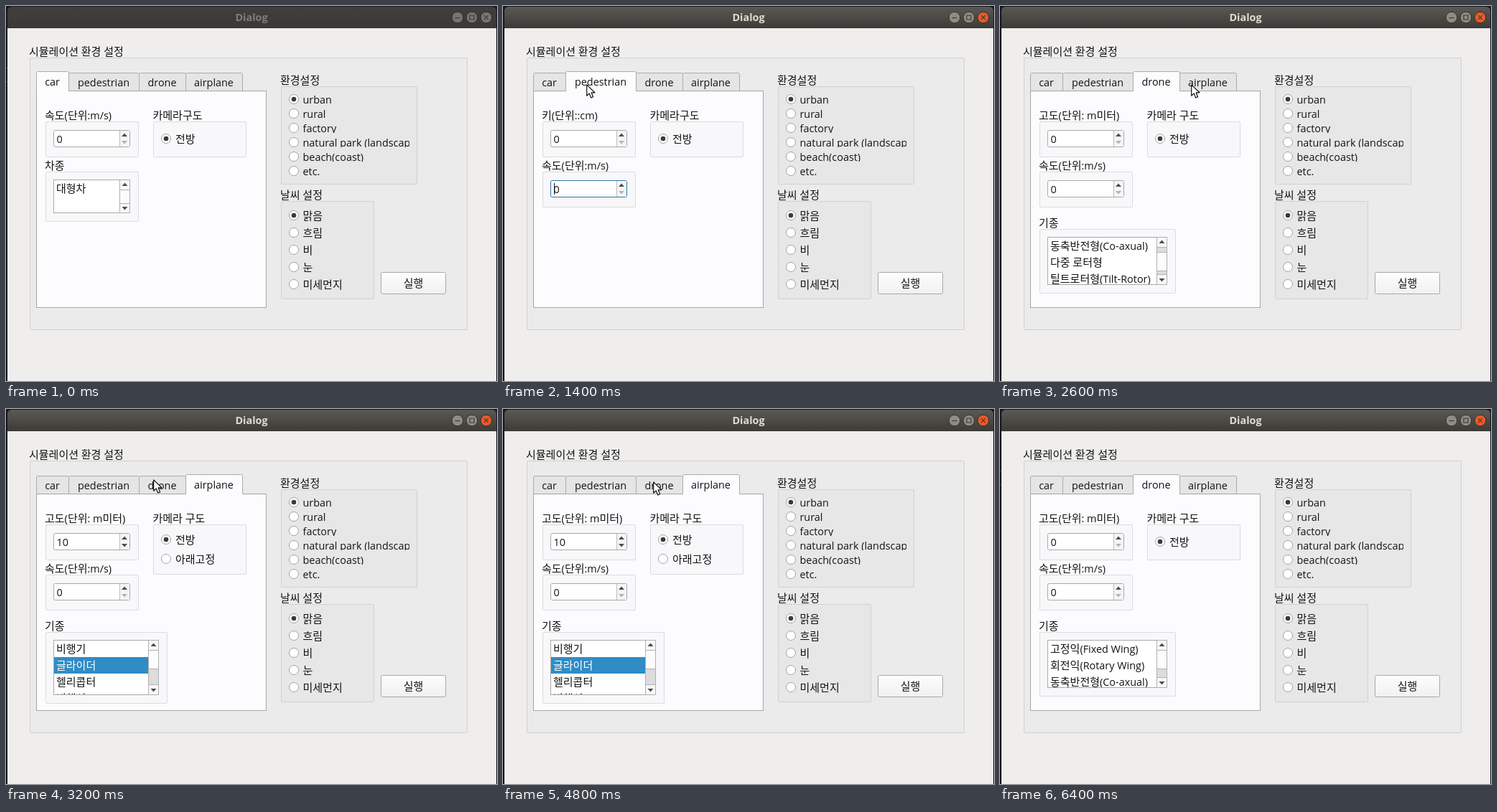
Write an HTML page that moves like this. It is 684 by 523 pixels and loops after 6500 ms.

```html
<!DOCTYPE html>
<html lang="ko">
<head>
<meta charset="utf-8">
<title>Dialog</title>
<style>
html, body { margin: 0; width: 100%; height: 100%; overflow: hidden; background: #17151d; }
#stage { display: block; position: absolute; left: 0; top: 0; }
text { font: 14.4px "Open Sans", "Noto Sans CJK KR", "Noto Sans CJK", sans-serif; fill: #141414; white-space: pre; }
.ko { font-family: "Noto Sans CJK KR", "Noto Sans CJK", sans-serif; font-size: 15px; }
.bold { font-weight: 700; }
.mid { text-anchor: middle; }
.light, .light tspan { fill: #fff; }
</style>
</head>
<body>
<svg id="stage" width="684" height="523" viewBox="0 0 684 523" xmlns="http://www.w3.org/2000/svg"></svg>
<script>
const LOOP = 6500, STEP = 100, ROW = 23;

// ---- markup helpers ----
const fill = (x, y, x2, y2, color) =>
  `<rect x="${x}" y="${y}" width="${x2 - x}" height="${y2 - y}" fill="${color}"/>`;

const box = (x, y, x2, y2, color, line, r = 0) =>
  `<rect x="${x + .5}" y="${y + .5}" width="${x2 - x - 1}" height="${y2 - y - 1}" rx="${r}" fill="${color}" stroke="${line}"/>`;

const label = (x, y, str, cls = '') => {
  const body = str.replace(/[가-힣]+/g, run => `<tspan class="ko">${run}</tspan>`);
  return `<text x="${x}" y="${y}" class="${cls}">${body}</text>`;
};

const clip = (x, y, x2, y2, body) =>
  `<svg x="${x}" y="${y}" width="${x2 - x}" height="${y2 - y}" viewBox="${x} ${y} ${x2 - x} ${y2 - y}" overflow="hidden">${body}</svg>`;

const radio = (x, y, on) =>
  `<circle cx="${x}" cy="${y}" r="6.5" fill="#fff" stroke="#a2a2a2"/>` +
  (on ? `<circle cx="${x}" cy="${y}" r="3.3" fill="#3a3a3a"/>` : '');

const arrow = (x, y, dir, color = '#4c4c4c') =>
  `<path d="M${x - 4} ${y - 2 * dir}h8l-4 ${4.5 * dir}z" fill="${color}"/>`;

const inner = (x, y, x2, y2) => box(x, y, x2, y2, '#f8f7f9', '#dcdbdd', 1.5);
const outer = (x, y, x2, y2) => box(x, y, x2, y2, '#e7e7e7', '#d1d1d1', 1.5);

function spin(y, value, focus) {
  return box(66, y, 173, y + 24, '#fff', focus ? '#2d76a5' : '#a9a9a9', 2) +
    fill(159, y + 1, 172, y + 23, '#f5f5f5') + fill(158, y + 1, 159, y + 23, '#bcbcbc') +
    arrow(165, y + 7, -1) + arrow(165, y + 17, 1, value ? '#4c4c4c' : '#b3b3b3') +
    label(70.5, y + 18, String(value)) +
    (focus ? fill(71, y + 4, 72, y + 20, '#111') : '');
}

function scrollBar(x, y, y2, top, size) {
  return box(x, y, x + 15, y2, '#dddddd', '#b0b0b0') +
    box(x, y, x + 15, y + 15, '#f8f8f8', '#b0b0b0') +
    box(x, y2 - 15, x + 15, y2, '#f8f8f8', '#b0b0b0') +
    box(x, top, x + 15, top + size, '#fcfcfc', '#b0b0b0') +
    arrow(x + 7.5, y + 7, -1) + arrow(x + 7.5, y2 - 7, 1);
}

function list(right, bottom, items, max, offset, chosen = -1) {
  const rows = items.map((name, i) => {
    const y = 323 + (i - offset) * ROW;
    const on = i === chosen;
    return (on ? fill(67, y, right - 15, y + ROW, '#308cc6') : '') +
      label(70, y + 17, name, on ? 'light' : '');
  }).join('');
  const room = bottom - 29 - 336 + 14 - 27;
  const top = 336 + Math.round(room * offset / max);
  return box(66, 322, right, bottom, '#fff', '#a9a9a9') +
    clip(67, 323, right - 15, bottom - 1, rows) +
    scrollBar(right - 15, 322, bottom, top, 27);
}

// ---- tab pages ----
const TABS = [['car', 42, 88], ['pedestrian', 87, 186], ['drone', 185, 251], ['airplane', 250, 330]];
const DRONES = ['고정익(Fixed Wing)', '회전익(Rotary Wing)', '동축반전형(Co-axual)', '다중 로터형', '틸트로터형(Tilt-Rotor)'];
const PLANES = ['비행기', '글라이더', '헬리콥터', '비행선', '열기구'];

function tabs(active) {
  const tab = ([name, x, x2], on) => {
    const y = on ? 91 : 93;
    return `<path d="M${x + .5} 118.5V${y + 2.5}q0 -2 2 -2H${x2 - 2.5}q2 0 2 2V118.5" fill="${on ? '#fcfbfd' : '#e6e5e5'}" stroke="#ababab"/>` +
      (on ? fill(x + 1, 118, x2 - 1, 119, '#fcfbfd') : '') +
      label((x + x2) / 2 - .5, on ? 111 : 112, name, 'mid');
  };
  return TABS.map((t, i) => i === active ? '' : tab(t)).join('') +
    box(42, 118, 363, 421, '#fcfbfd', '#a6a6a6') + tab(TABS[active], true);
}

const field = (y, title, value, focus) =>
  label(54, y - 3, title) + inner(55, y, 185, y + 50) + spin(y + 12, value, focus);

const camera = title =>
  label(204.5, 158, title) + inner(205, 161, 335, 211) + radio(223, 185, true) + label(236, 191, '전방');

const PAGES = [
  () => field(161, '속도(단위:m/s)', 0) + camera('카메라구도') +
    label(54, 228, '차종') + inner(55, 231, 185, 301) +
    box(66, 242, 173, 289, '#fff', '#a9a9a9') + label(70, 260, '대형차') +
    scrollBar(158, 242, 289, 256, 20),
  () => field(161, '키(단위::cm)', 0) + camera('카메라구도') + field(231, '속도(단위:m/s)', 0, true),
  s => field(161, '고도(단위: m미터)', 0) + camera('카메라 구도') + field(231, '속도(단위:m/s)', 0) +
    label(54, 308, '기종') + inner(55, 311, 245, 401) + list(233, 389, DRONES, 3, s.drone),
  s => field(161, '고도(단위: m미터)', 10) + field(231, '속도(단위:m/s)', 0) +
    label(204.5, 158, '카메라 구도') + inner(205, 161, 335, 231) +
    radio(223, 182, true) + label(236, 188, '전방') +
    radio(223, 209, false) + label(236, 215, '아래고정') +
    label(54, 308, '기종') + inner(55, 311, 225, 411) + list(213, 399, PLANES, 2, s.plane, 1)
];

// ---- fixed parts ----
function titleBar(active) {
  const ink = '#3c3b37';
  const button = (x, color, icon) =>
    `<circle cx="${x}" cy="16" r="7.8" fill="${color}" stroke="#32312e"/><path d="${icon}" fill="none" stroke="${ink}" stroke-width="1.2"/>`;
  const gray = active ? '#8f8c84' : '#77756f';
  return `<path d="M2 31V7q0 -6 6 -6H677q6 0 6 6V31z" fill="url(#${active ? 'on' : 'off'})"/>` +
    `<text x="342" y="21" class="bold mid" style="fill:${active ? '#dfdbd2' : '#807d78'}">Dialog</text>` +
    button(629, gray, 'M625.5 16.5h7') + button(649, gray, 'M646 13h6v6h-6z') +
    button(669, active ? '#ea5a2a' : gray, 'M666.2 13.2l5.6 5.6m0 -5.6l-5.6 5.6');
}

const gradient = (id, a, b) =>
  `<linearGradient id="${id}" x2="0" y2="1"><stop stop-color="${a}"/><stop offset="1" stop-color="${b}"/></linearGradient>`;

const options = (names, y, gap, dy, cut) => names.map((name, i) => {
  const base = y + dy + i * gap;
  return radio(401, y + i * gap, i === 0) + clip(413, base - 16, 562, base + cut, label(413.5, base, name));
}).join('');

const FRAME =
  `<defs>${gradient('on', '#5a5953', '#3c3b37')}${gradient('off', '#403f3b', '#3a3935')}${gradient('btn', '#fefefe', '#f1f0f1')}</defs>` +
  fill(0, 0, 684, 523, '#17151d') + fill(2, 31, 683, 523, '#efeeec') +
  label(32, 69, '시뮬레이션 환경 설정') + box(33, 72, 643, 452, '#ebebeb', '#d0d0cf', 1.5) +
  label(382, 109, '환경설정') + outer(383, 112, 573, 249) +
  options(['urban', 'rural', 'factory', 'natural park (landscape)', 'beach(coast)', 'etc.'], 130, 20, 6, 1) +
  label(382, 269, '날씨 설정') + outer(383, 272, 513, 409) +
  options(['맑음', '흐림', '비', '눈', '미세먼지'], 292, 24, 6, 5) +
  box(522, 371, 613, 402, 'url(#btn)', '#a9a9a9', 2) + label(567.5, 392, '실행', 'mid');

const POINTER = '<path d="M.7 .9V16.2L4.2 12.9L6.7 18.9L9.6 17.7L7.1 11.8H11.9Z" fill="#fff" stroke="#111" stroke-width="1.2" stroke-linejoin="round"/>';

// ---- timeline ----
const PATH = [
  [500, 376, 13], [900, 135, 104], [1000, 135, 104], [1400, 116, 109], [1600, 116, 109],
  [1900, 215, 106], [2100, 270, 108], [2300, 270, 108], [2600, 266, 109], [3000, 248, 106],
  [3200, 205, 98], [3400, 160, 319], [3500, 160, 319], [3700, 140, 382], [3900, 136, 374],
  [4100, 136, 374], [4500, 203, 140], [4600, 203, 140], [4800, 209, 101], [5000, 211, 106],
  [5100, 211, 106], [5600, 115, 355], [5700, 115, 355], [6000, 128, 136]
];
const PAGE = [[0, 0], [1100, 1], [1900, 2], [2700, 3], [4900, 2]];
const DRONE = [[0, 2], [5400, 3], [5600, 2], [5800, 1], [5900, 0]];
const PLANE = [[0, 0], [3700, 1], [3800, 2], [4300, 1], [4400, 0]];

const held = (keys, t) => keys.filter(k => k[0] <= t).pop()[1];

function pointerAt(t) {
  const i = PATH.findIndex(k => k[0] > t);
  if (i < 0) return PATH[PATH.length - 1].slice(1);
  const [t0, x0, y0] = PATH[i - 1], [t1, x1, y1] = PATH[i];
  const u = (t - t0) / (t1 - t0);
  return [x0 + (x1 - x0) * u, y0 + (y1 - y0) * u].map(Math.round);
}

const stage = document.getElementById('stage');
stage.innerHTML = FRAME + '<g id="bar"></g><g id="page"></g><g id="edge"></g><g id="pointer">' + POINTER + '</g>';
const [bar, page, edge, pointer] = ['bar', 'page', 'edge', 'pointer'].map(id => document.getElementById(id));
edge.innerHTML = fill(0, 86, 2, 87, '#263c8c') + fill(0, 105, 2, 106, '#263c8c');

let last = '';
function draw(now) {
  const t = Math.floor((now % LOOP) / STEP) * STEP;
  const active = t >= 1100;
  const s = { page: held(PAGE, t), drone: held(DRONE, t), plane: held(PLANE, t) };
  const key = JSON.stringify([active, s]);
  if (key !== last) {
    bar.innerHTML = titleBar(active);
    page.innerHTML = tabs(s.page) + PAGES[s.page](s);
    last = key;
  }
  edge.style.display = !active || t >= 6400 ? '' : 'none';
  const shown = t >= 500 && t < 6200;
  pointer.style.display = shown ? '' : 'none';
  if (shown) pointer.setAttribute('transform', `translate(${pointerAt(t)})`);
}

const start = performance.now();
function tick() {
  draw(performance.now() - start);
  requestAnimationFrame(tick);
}
tick();
</script>
</body>
</html>
```
